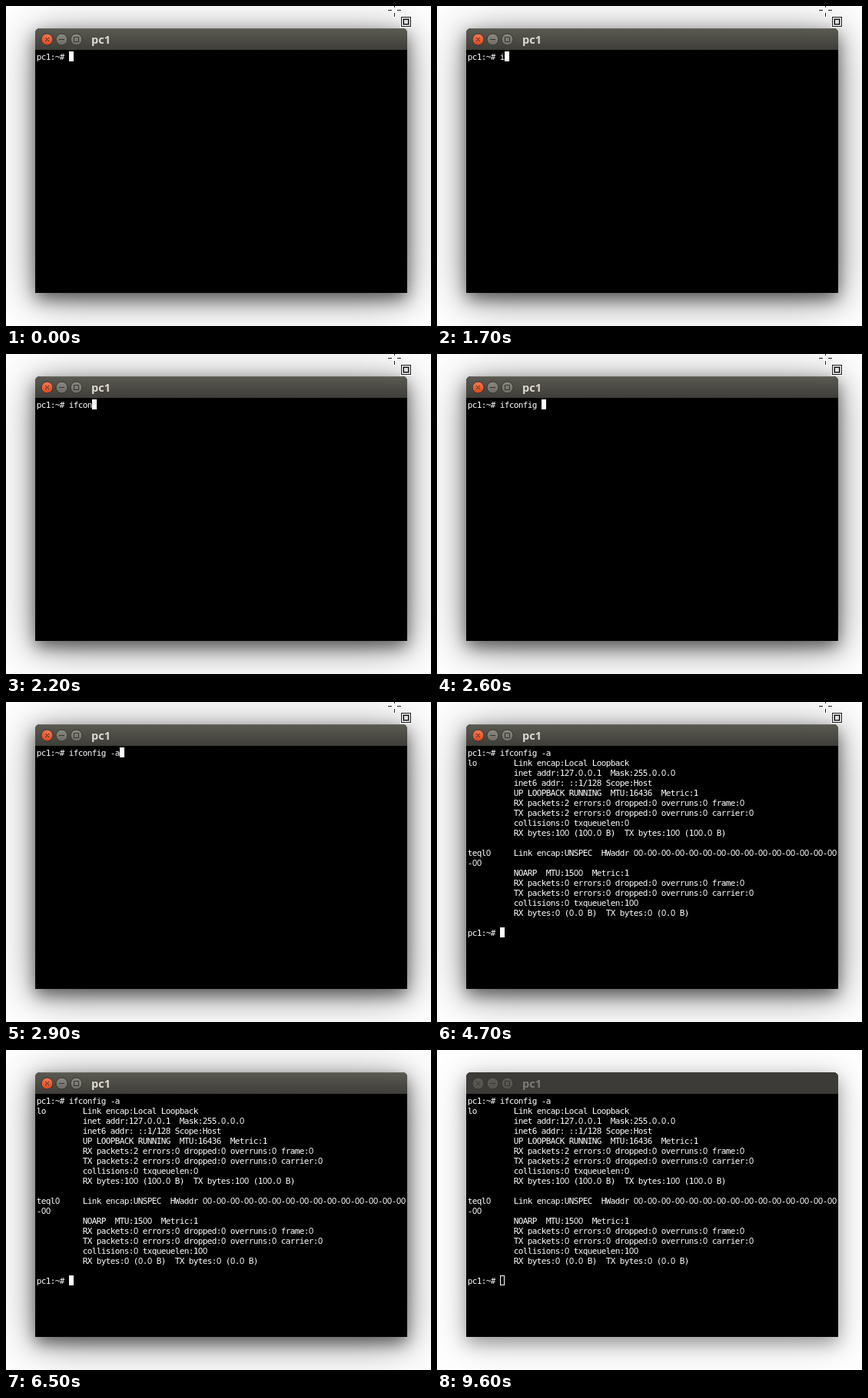
An HTML page with a canvas for the animation above (9800 ms loop, 553 by 416 pixels).

```html
<!DOCTYPE html>
<html lang="en">
<head>
<meta charset="utf-8">
<title>Terminal</title>
<style>
html, body { margin: 0; width: 100%; height: 100%; overflow: hidden; background: #fff; }
canvas { display: block; }
</style>
</head>
<body>
<canvas id="stage" width="553" height="416"></canvas>
<script>
const ctx = document.getElementById('stage').getContext('2d');
const LOOP = 9800, OUTPUT_AT = 4700, BLUR_AT = 9600;
const PROMPT = 'pc1:~# ', COMMAND = 'ifconfig -a';
// [time, number of typed characters]
const KEYS = [[1700, 1], [1800, 2], [2000, 3], [2100, 4], [2200, 5], [2300, 7],
  [2500, 8], [2600, 9], [2800, 10], [2900, 11]];
const PAD = ' '.repeat(10);
const OUTPUT = [
  'lo        Link encap:Local Loopback',
  PAD + 'inet addr:127.0.0.1  Mask:255.0.0.0',
  PAD + 'inet6 addr: ::1/128 Scope:Host',
  PAD + 'UP LOOPBACK RUNNING  MTU:16436  Metric:1',
  PAD + 'RX packets:2 errors:0 dropped:0 overruns:0 frame:0',
  PAD + 'TX packets:2 errors:0 dropped:0 overruns:0 carrier:0',
  PAD + 'collisions:0 txqueuelen:0',
  PAD + 'RX bytes:100 (100.0 B)  TX bytes:100 (100.0 B)',
  '',
  'teql0     Link encap:UNSPEC  HWaddr 00' + '-00'.repeat(14),
  '-00',
  PAD + 'NOARP  MTU:1500  Metric:1',
  PAD + 'RX packets:0 errors:0 dropped:0 overruns:0 frame:0',
  PAD + 'TX packets:0 errors:0 dropped:0 overruns:0 carrier:0',
  PAD + 'collisions:0 txqueuelen:100',
  PAD + 'RX bytes:0 (0.0 B)  TX bytes:0 (0.0 B)',
  '',
  PROMPT
];
const cellX = col => 40 + 6 * col;
const cellY = row => 59 + 13 * row;

function rect(color, x, y, w, h) {
  ctx.fillStyle = color;
  ctx.fillRect(x, y, w, h);
}

function box(color, x, y, w, h) {
  ctx.strokeStyle = color;
  ctx.strokeRect(x + .5, y + .5, w - 1, h - 1);
}

function gradient(y0, y1, from, to) {
  const g = ctx.createLinearGradient(0, y0, 0, y1);
  g.addColorStop(0, from);
  g.addColorStop(1, to);
  return g;
}

function frame(x, y, w, h, r) {
  ctx.beginPath();
  ctx.roundRect(x, y, w, h, r);
}

function shadow(blur, alpha, dy) {
  ctx.save();
  ctx.shadowColor = `rgba(0,0,0,${alpha})`;
  ctx.shadowBlur = blur;
  ctx.shadowOffsetY = dy;
  ctx.fillStyle = '#3c3b37';
  frame(38, 29, 484, 344, [6, 6, 0, 0]);
  ctx.fill();
  ctx.restore();
}

function button(x, top, bottom, sign) {
  ctx.beginPath();
  ctx.arc(x, 43.5, 7.5, 0, 7);
  ctx.fillStyle = gradient(36, 51, top, bottom);
  ctx.fill();
  ctx.strokeStyle = '#33322e';
  ctx.stroke();
  ctx.stroke(new Path2D(`M${x} 43.5${sign}`));
}

function drawWindow(focused) {
  shadow(60, focused ? .4 : .12, 8);
  shadow(focused ? 22 : 24, focused ? .55 : .38, 8);
  ctx.fillStyle = focused ? gradient(29, 57, '#5b5a52', '#3e3d38') : '#3c3b37';
  frame(38, 29, 484, 40, [6, 6, 0, 0]);
  ctx.fill();
  if (focused) rect('#6b6a62', 43, 29, 474, 1);
  rect('#000', 38, 57, 484, 316);
  const [top, bottom] = focused ? ['#8b8981', '#6d6b64'] : ['#5c5a54', '#55534d'];
  button(53.5, focused ? '#f37b55' : top, focused ? '#dc4517' : bottom,
    'm-2.5-2.5l5 5m0-5l-5 5');
  button(72.5, top, bottom, 'm-3.5 0h7');
  button(91.5, top, bottom, 'm-3-3h6v6h-6z');
  ctx.font = 'bold 14.5px "Open Sans", sans-serif';
  ctx.fillStyle = focused ? '#dfdbd2' : '#807d78';
  ctx.fillText('pc1', 111, 49);
}

function drawTerminal(lines, focused) {
  ctx.fillStyle = '#fff';
  ctx.textAlign = 'center';
  lines.forEach((line, row) => [...line].forEach((ch, col) => {
    // plain zeros have no inner mark
    ctx.font = ch === '0' ? '11px "Liberation Sans", sans-serif'
      : '11px "DejaVu Sans Mono", monospace';
    ctx.fillText(ch, cellX(col) + 3, cellY(row) + 11);
  }));
  ctx.textAlign = 'left';
  const row = lines.length - 1, x = cellX(lines[row].length), y = cellY(row);
  if (focused) rect('#fff', x, y, 6, 13);
  else box('#fff', x, y, 6, 13);
}

function drawPointer(t) {
  if (t >= 6500) return;
  const step = Math.max(0, Math.floor((t - 6000) / 100));
  const s = (step / 4) ** 1.5;
  ctx.save();
  ctx.translate(Math.round(-236 * s), Math.round(-10 * s));
  for (const [x, y, w, h] of [[497, 5, 5, 1], [509, 5, 5, 1], [505, -3, 1, 5], [505, 9, 1, 5]]) {
    rect('#fff', x - 1, y - 1, w + 2, h + 2);
    rect('#111', x, y, w, h);
  }
  rect('#fff', 513, 13, 15, 15);
  box('#111', 514, 14, 13, 13);
  ctx.setLineDash([1, 1]);
  box('#111', 516, 16, 9, 9);
  ctx.setLineDash([]);
  box('#111', 517, 17, 7, 7);
  rect('#ddd', 518, 18, 5, 5);
  ctx.restore();
}

function draw(now) {
  const t = now % LOOP, focused = t < BLUR_AT;
  const typed = KEYS.reduce((n, [at, count]) => t >= at ? count : n, 0);
  const lines = [PROMPT + COMMAND.slice(0, typed)];
  if (t >= OUTPUT_AT) lines.push(...OUTPUT);
  rect('#fff', 0, 0, 553, 416);
  drawWindow(focused);
  drawTerminal(lines, focused);
  drawPointer(t);
  requestAnimationFrame(draw);
}
requestAnimationFrame(draw);
</script>
</body>
</html>
```
